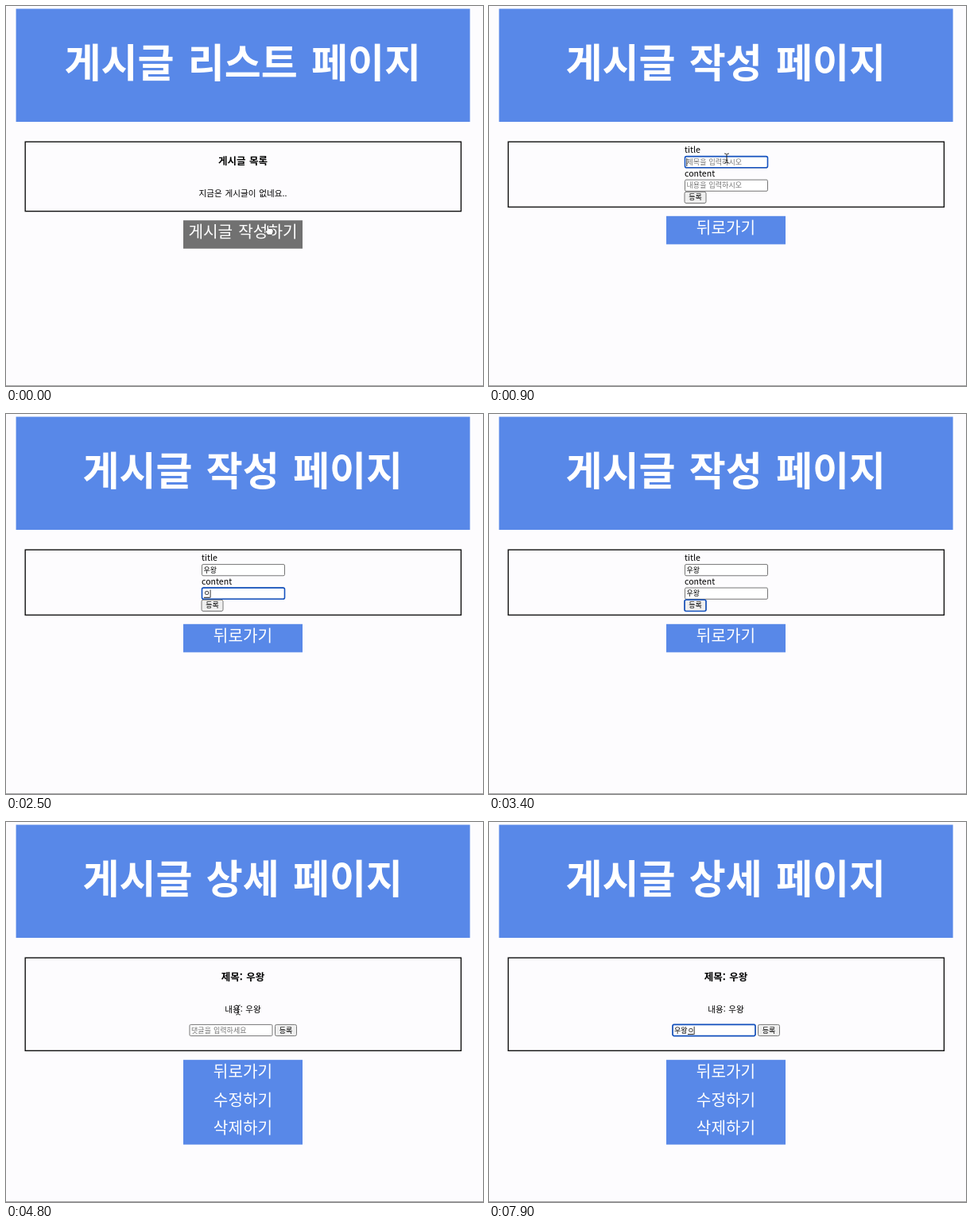
Recreate the animation shown at these times as an HTML page. Size 600 px wide and 479 px high, loop 8 s.

```html
<!DOCTYPE html>
<html lang="ko">
<head>
<meta charset="utf-8">
<title>게시글</title>
<style>
  html, body { margin: 0; width: 100%; height: 100%; overflow: hidden; background: #fdfcfe; }
  svg { display: block; width: 600px; height: 479px; }
  text { font-family: "Noto Sans CJK KR", "Noto Sans CJK", "Noto Sans", sans-serif; white-space: pre; }
  .title { font-size: 50px; font-weight: 700; word-spacing: 3.3px; fill: #fff; text-anchor: middle; }
  .head { font-size: 12.5px; font-weight: 700; word-spacing: 1px; text-anchor: middle; }
  .body { font-size: 10.6px; font-weight: 500; word-spacing: .8px; text-anchor: middle; }
  .label { font-size: 10.6px; }
  .link { font-size: 20.2px; font-weight: 500; word-spacing: 1.5px; fill: #fff; text-anchor: middle; }
  .small { font-size: 9px; word-spacing: .6px; }
  .hint { fill: #757575; }
  .mid { text-anchor: middle; }
</style>
</head>
<body>
<svg viewBox="0 0 600 479"><g id="stage"></g></svg>
<script>
const LOOP = 8000, STEP = 100;
const BLUE = '#5888e8', HOVER = '#717171', RING = '#1553c0';
const GLYPH = 8.28;

// [time, text]; the last syllable is underlined while it is being composed
const titleKeys = [[0, ''], [1300, 'ㅇ'], [1400, '우'], [1600, '웅'], [1700, '우오'], [1800, '우와'], [1900, '우왕']];
const contentKeys = [[0, ''], [2500, 'ㅇ'], [2600, '우'], [2800, '웅'], [2900, '우와'], [3000, '우왕']];
const commentKeys = [[0, ''], [5400, 'ㅇ'], [5600, '우'], [5700, '웅'], [5800, '우오'], [5900, '우왜'], [6000, '우왱'],
  [6300, '우왜'], [6400, '우오'], [6500, '우와'], [6600, '우왕'], [6700, '우왕ㅇ'], [6800, '우왕우'], [6900, '우왕웅'],
  [7000, '우왕우오'], [7200, '우왕우왜'], [7300, '우왕우왱'], [7400, '우왕우'], [7600, '우왕'], [7900, '우왕ㅇ']];

const at = (keys, t) => keys.filter(k => k[0] <= t).pop()[1];
const ease = p => p * p * (3 - 2 * p);
const clamp = p => Math.max(0, Math.min(1, p));
const glide = (t, start, end, a, b) => {
  const p = ease(clamp((t - start) / (end - start)));
  return [a[0] + (b[0] - a[0]) * p, a[1] + (b[1] - a[1]) * p];
};

const text = (cls, x, y, s) => `<text class="${cls}" x="${x}" y="${y}">${s}</text>`;
const rect = (x, y, w, h, fill, extra = '') => `<rect x="${x}" y="${y}" width="${w}" height="${h}" fill="${fill}" ${extra}/>`;
const line = (x1, y1, x2, y2, color = '#000', w = 1) =>
  `<path d="M${x1} ${y1}L${x2} ${y2}" stroke="${color}" stroke-width="${w}"/>`;

const frame = (title, height) =>
  rect(12.6, 3.5, 571, 142.5, BLUE) + text('title', 297.8, 90.3, title) +
  rect(24.2, 171.2, 548.2, height, 'none', 'stroke="#111" stroke-width="1.4"') +
  line(0, 478.5, 600, 478.5, '#a5a4a6');

const links = (y, labels, fill = BLUE) =>
  rect(223, y, 150, 35.6 * labels.length, fill) +
  labels.map((s, i) => text('link', 298, y + 22.2 + 35.6 * i, s)).join('');

const ring = (x, y, w, h) => rect(x, y, w, h, 'none', `rx="2" stroke="${RING}" stroke-width="1.6"`);

function input(x, y, hint, value, focused, composing) {
  const left = x + 2.6, base = y + 10.7, end = left + value.length * GLYPH;
  let out = rect(x + .5, y + .6, 104, 14.2, '#fff', 'rx="1.5" stroke="#767676" stroke-width="1"');
  out += value ? text('small', left, base, value) : text('small hint', left, base, hint);
  if (!focused) return out;
  out += ring(x + .5, y + .6, 104, 14.2) + line(end + .2, y + 3, end + .2, y + 13, '#000', .8);
  if (value && composing) out += line(end - GLYPH + .3, y + 12.8, end - .3, y + 12.8, '#000', .9);
  return out;
}

const button = (x, y, focused) =>
  rect(x + .5, y + .6, 27, 14.2, '#efefef', 'rx="2" stroke="#767676" stroke-width="1"') +
  (focused ? ring(x + .5, y + .6, 27, 14.2) : '') + text('small mid', x + 14, y + 10.7, '등록');

const hand = ([x, y]) => `<path transform="translate(${x} ${y})" fill="#fff" stroke="#333" stroke-width=".7" stroke-linejoin="round"
  d="M-3 1V-5Q-1.7-7-.4-5V-1.4Q3.5-2.4 5-.2V3L3.6 6.5H-1.8L-5.2 1.8Q-4.8 0-3 1.4Z"/>`;

const beam = ([x, y]) => `<path transform="translate(${x} ${y})" fill="none" stroke="#222" stroke-width="1"
  d="M-2.8-6Q-.3-6 0-4.5Q.3-6 2.8-6M0-4.5V4.5M-2.8 6Q-.3 6 0 4.5Q.3 6 2.8 6M-1.3 2.5H1.3"/>`;

const listPage = () =>
  frame('게시글 리스트 페이지', 87.5) + text('head', 298, 200.3, '게시글 목록') +
  text('body', 298, 239.6, '지금은 게시글이 없네요..') +
  links(270.2, ['게시글 작성하기'], HOVER) + hand([331, 282]);

function formPage(t) {
  const pos = glide(t, 200, 700, [331, 282], [299, 192]);
  const hovered = pos[1] > 265;
  const focus = t < 800 ? '' : t < 2200 ? 'title' : t < 3300 ? 'content' : 'submit';
  const cursor = t >= 1300 ? '' : hovered ? hand(pos) : beam(pos);
  return frame('게시글 작성 페이지', 82.2) +
    text('label', 246, 185, 'title') +
    input(246, 189, '제목을 입력하시오', at(titleKeys, t), focus === 'title', true) +
    text('label', 246, 214.5, 'content') +
    input(246, 218.5, '내용을 입력하시오', at(contentKeys, t), focus === 'content', true) +
    button(245.5, 233.7, focus === 'submit') +
    links(264.8, ['뒤로가기'], hovered ? HOVER : BLUE) + cursor;
}

function detailPage(t) {
  const pos = t < 4800 ? glide(t, 4400, 4800, [299, 192], [292, 237])
                       : glide(t, 4800, 5100, [292, 237], [268, 264]);
  const composing = t < 7600 || t >= 7900;
  return frame('게시글 상세 페이지', 117.1) +
    text('head', 298, 200.3, '제목: 우왕') + text('body', 298, 239.6, '내용: 우왕') +
    input(230.5, 254.8, '댓글을 입력하세요', at(commentKeys, t), t >= 5100, composing) +
    button(338, 254.8, false) +
    links(299.8, ['뒤로가기', '수정하기', '삭제하기']) +
    (t >= 4500 && t < 5400 ? beam(pos) : '');
}

const stage = document.getElementById('stage');
let shown = -1;

function draw(now) {
  const t = Math.floor((now % LOOP) / STEP) * STEP;
  if (t !== shown) {
    shown = t;
    stage.innerHTML = t < 200 ? listPage() : t < 3800 ? formPage(t) : detailPage(t);
  }
  requestAnimationFrame(draw);
}
draw(0);
</script>
</body>
</html>
```
